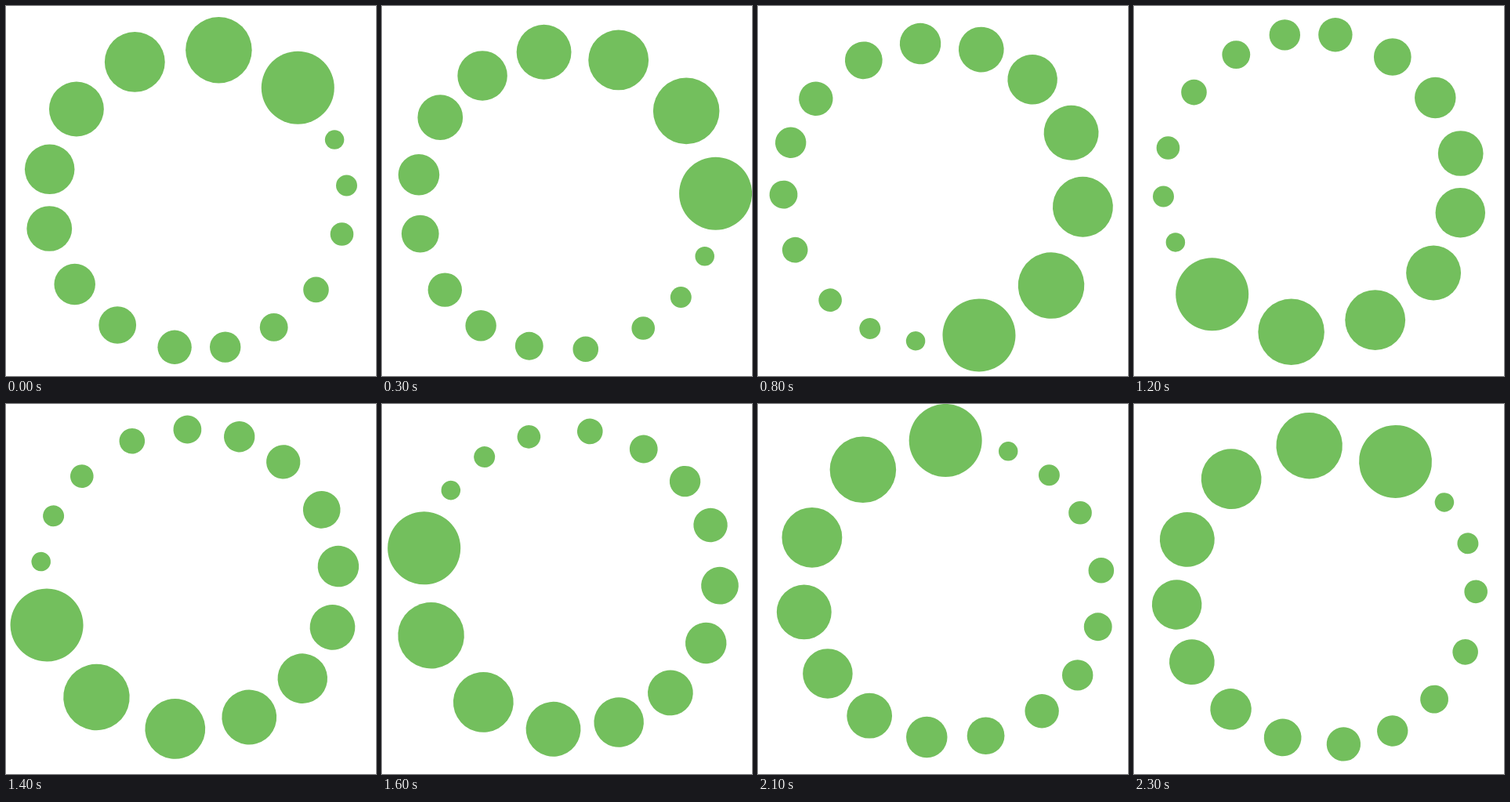
These frames come from a looping animation (472x472 px, 2400 ms). An HTML page:

```html
<!DOCTYPE html>
<html lang="en">
<head>
<meta charset="utf-8">
<title>Spinner</title>
<style>
  html, body { margin: 0; width: 100%; height: 100%; overflow: hidden; background: #fff; }
  svg { display: block; width: 100vw; height: 100vh; }
</style>
</head>
<body>
<svg viewBox="0 0 472 472"><g id="ring" fill="#73bf5d"></g></svg>
<script>
const ring = document.getElementById('ring');
const CENTER = 236, STEPS = 24, STEP_MS = 100;
const MAX_RADIUS = 46.5, SHRINK = 1.1;

// Dot centres, largest first
const dots = [
  [372.3, 104.2], [271.4, 56.2], [164.3, 71.4], [89.9, 131.5], [55.7, 208.3],
  [55.3, 284], [87.7, 355], [142.2, 407], [215.1, 435.3], [279.7, 435.1],
  [341.7, 409.9], [395.5, 361.9], [428.5, 291], [434.5, 229], [419.1, 170.6]
];

ring.innerHTML = dots.map(([x, y], i) =>
  `<circle cx="${x}" cy="${y}" r="${MAX_RADIUS / SHRINK ** i}"/>`).join('');

function draw(now) {
  const step = Math.floor(Math.max(0, now) / STEP_MS) % STEPS;
  ring.setAttribute('transform', `rotate(${step * 360 / STEPS} ${CENTER} ${CENTER})`);
}

const start = performance.now();
function tick() {
  draw(performance.now() - start);
  requestAnimationFrame(tick);
}
tick();
</script>
</body>
</html>
```
